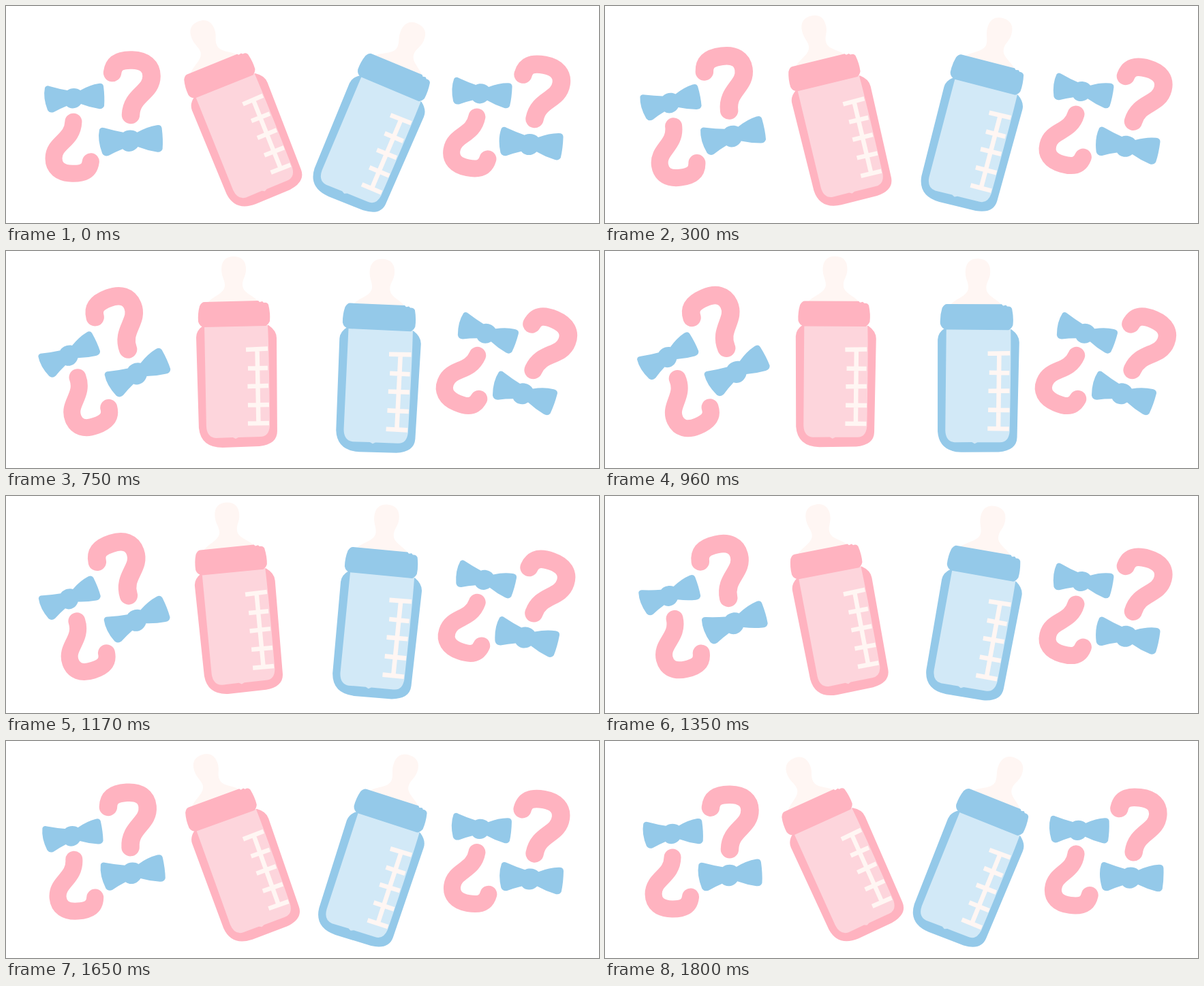
An HTML page that plays this animation: 870 by 319 pixels, repeating every 1.9 s.

```html
<!DOCTYPE html>
<html lang="en">
<head>
<meta charset="utf-8">
<title>Bottles, bows and question marks</title>
<style>
  html, body { margin: 0; width: 100%; height: 100%; overflow: hidden; background: #fff; }
  svg { display: block; width: 870px; height: 319px; }
  .pink { --main: #ffb3c0; --light: #fdd5dc; }
  .blue { --main: #94c9e9; --light: #d2e9f7; }
  .main { fill: var(--main); }
  .light { fill: var(--light); }
  .cream { fill: #fff6f3; }
  .marks { fill: none; stroke: #fff6f3; stroke-width: 6.5; }
  .question { fill: none; stroke: #ffb3c0; stroke-width: 26.5; stroke-linecap: round; stroke-linejoin: round; }
</style>
</head>
<body>
<svg viewBox="0 0 870 319">
  <defs>
    <g id="bottle">
      <path class="cream" d="M296 76C304 66 320 63 321 51C321 42 316 38 316 27C316 14 323 8 334 8C345 8 352 14 352 27C352 38 346 42 347 51C348 63 366 66 371 76Z"/>
      <path class="main" d="M289 110Q279 117 279 127L283 260Q286 289 318 289L372 287Q398 284 398 265L397 128Q397 117 385 109Z"/>
      <path class="light" d="M291 110L384 109Q386 150 387 257Q386 273 373 273L341 274L337 276L333 274L308 275Q295 274 294 258Z"/>
      <path class="main" d="M291 75L370 73L372 75L376 74L378 76Q383 75 385 79Q388 92 387 103Q385 108 381 110L291 112Q284 111 282 104Q281 92 284 81Q287 75 291 75Z"/>
      <path class="marks" d="M368.5 144L370.5 253M352 145L384 143.5M355 172.5L384 172M354.5 199L385 198M355 226.500L386 226M355 253.500L386 253"/>
    </g>
    <path id="bow" fill="#94c9e9" transform="translate(-99.500 -135.500)" d="M57 120Q59 116 64 118Q78 122 90 124C95 120 104 120 109 124Q123 116 136 114Q142 113 143 118Q145 134 144 147Q142 152 136 151Q123 149 110 144C104 152 94 152 89 147Q79 151 70 156Q64 158 61 153Q54 135 57 120Z"/>
    <path id="question" class="question" d="M156 98C158 82 170 79 185 79.500C204 80 213.500 89 213.500 103C213.500 128 184 130 183 160"/>
    <g id="cluster">
      <use href="#question"/>
      <use href="#question" transform="translate(97 208) scale(-.945) translate(-185 -120)"/>
      <use href="#bow" transform="translate(99.500 135.500)"/>
      <use href="#bow" transform="translate(182.3 198) scale(1.065)"/>
    </g>
  </defs>
  <g id="leftCluster"><use href="#cluster"/></g>
  <g id="leftBottle" class="pink"><use href="#bottle"/></g>
  <g id="rightBottle" class="blue">
    <use href="#bottle" transform="translate(562.3 146) rotate(3.6) scale(1.015) translate(-352 -139.500)"/>
  </g>
  <g id="rightCluster">
    <use href="#cluster" transform="translate(734.2 161.8) rotate(7.8) translate(-141.500 -162.3)"/>
  </g>
</svg>
<script>
  const LOOP = 1900, STEP = 30, LAST = 1800, SOFTNESS = 60;

  // Angles in degrees, rates in degrees per ms on either side of the turning point.
  const swings = [
    { id: 'leftCluster',  pivot: '141.5 162.3', turn: 910, peak: -25.5, rise: -.03,   fall: -.0295 },
    { id: 'leftBottle',   pivot: '348 157',     turn: 888, peak: 2.57,  rise: .028,   fall: .03 },
    { id: 'rightBottle',  pivot: '538.5 162',   turn: 900, peak: -2.5,  rise: -.0272, fall: -.0262 },
    { id: 'rightCluster', pivot: '734.2 161.8', turn: 860, peak: 15,    rise: .0172,  fall: .02 }
  ].map(swing => ({ ...swing, node: document.getElementById(swing.id) }));

  // Steady swing up and back with a slightly rounded turn.
  function angleAt({ turn, peak, rise, fall }, time) {
    const distance = Math.hypot(time - turn, SOFTNESS) - SOFTNESS;
    return peak - distance * (time < turn ? rise : fall);
  }

  function draw(elapsed) {
    const time = Math.min(LAST, Math.floor((elapsed % LOOP) / STEP) * STEP);
    for (const swing of swings) {
      swing.node.setAttribute('transform', `rotate(${angleAt(swing, time).toFixed(3)} ${swing.pivot})`);
    }
  }

  const start = performance.now();
  function tick() {
    draw(performance.now() - start);
    requestAnimationFrame(tick);
  }
  tick();
</script>
</body>
</html>
```
